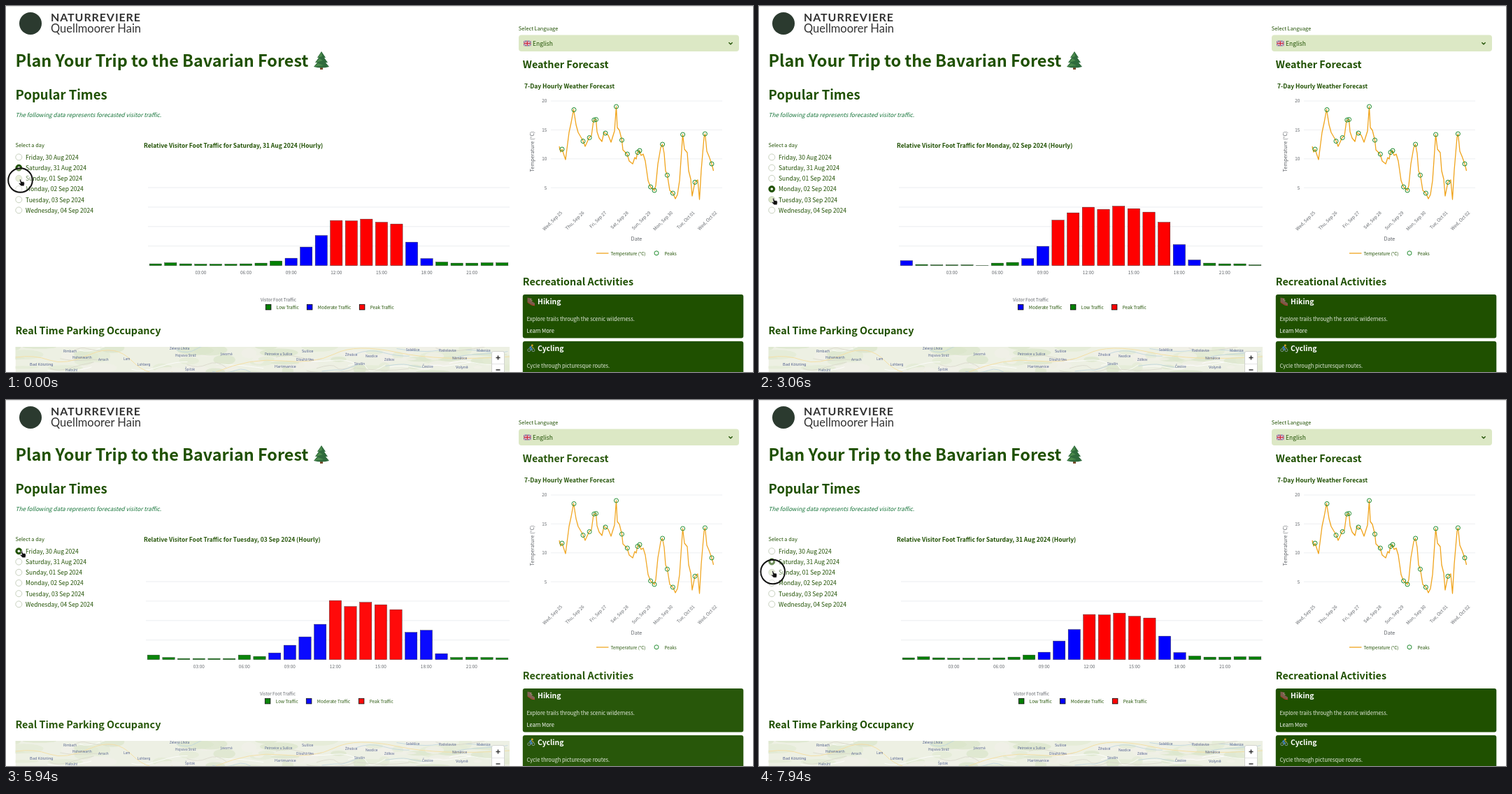
Recreate the animation shown at these times as an HTML page. Size 1068 by 524 pixels, loop 8000 ms.

```html
<!DOCTYPE html>
<html lang="en">
<head>
<meta charset="utf-8">
<title>Trip planner</title>
<style>
html, body { margin: 0; width: 100%; height: 100%; overflow: hidden; background: #fff; }
svg { display: block; width: 100vw; height: 100vh; }
text { font-family: "Noto Sans CJK JP", "Noto Sans CJK SC", "Noto Sans CJK KR", "Noto Sans CJK", "Noto Sans", sans-serif; fill: #1f5000; white-space: pre; }
.logo text { font-family: Lato, sans-serif; fill: #333; }
.map text { font-family: "Noto Sans", sans-serif; fill: #52608f; }
</style>
</head>
<body>
<svg id="stage" viewBox="0 0 1068 524" preserveAspectRatio="none"></svg>
<script>
const NS = 'http://www.w3.org/2000/svg';
const LOOP = 8000;
const GREEN = '#1f5000';
const GREY = '#5f6368';
const stage = document.getElementById('stage');

function add(parent, tag, attrs = {}) {
  const node = document.createElementNS(NS, tag);
  for (const key in attrs) node.setAttribute(key, attrs[key]);
  parent.appendChild(node);
  return node;
}
const group = (parent, attrs) => add(parent, 'g', attrs);
const rect = (parent, x, y, width, height, fill, more) => add(parent, 'rect', { x, y, width, height, fill, ...more });
const circle = (parent, cx, cy, r, fill, more) => add(parent, 'circle', { cx, cy, r, fill, ...more });
const path = (parent, d, stroke, width = 1, more) =>
  add(parent, 'path', { d, fill: 'none', stroke, 'stroke-width': width, ...more });
function label(parent, str, x, y, size, more) {
  const node = add(parent, 'text', { x, y, 'font-size': size, ...more });
  node.textContent = str;
  return node;
}
const bold = { 'font-weight': 700 };
const semi = { 'font-weight': 600 };
const mid = { 'text-anchor': 'middle' };

// ---- header ----
const page = group(stage);
rect(page, 0, 0, 1068, 1, '#e4e4e4');
const logo = group(page, { class: 'logo' });
circle(logo, 35, 25, 16, '#2b3a2f');
label(logo, 'NATURREVIERE', 64, 21.6, 16, { ...bold, 'letter-spacing': 0.9 });
label(logo, 'Quellmoorer Hain', 64, 37.5, 16.5);
label(page, 'Plan Your Trip to the Bavarian Forest', 13.5, 87, 23.4, bold);

const tree = group(page, { transform: 'translate(451 65)' });
rect(tree, -2, 20, 4, 6, '#7a4a2b');
add(tree, 'path', { d: 'M0 0L6 9H4L9 16H6L11 22Q0 25-11 22L-6 16H-9L-4 9H-6Z', fill: '#2f6b3c' });
add(tree, 'path', { d: 'M0 1L-5 9L1 7ZM-3 10L-8 16L2 13ZM-5 17L-10 22L3 20Z', fill: '#4c8a4d' });

label(page, 'Popular Times', 13.5, 133.5, 18.5, semi);
label(page, 'The following data represents forecasted visitor traffic.', 13.5, 158.8, 8.25,
  { 'font-style': 'italic', style: 'fill:#17753a' });

// ---- day picker ----
const days = ['Friday, 30 Aug 2024', 'Saturday, 31 Aug 2024', 'Sunday, 01 Sep 2024',
  'Monday, 02 Sep 2024', 'Tuesday, 03 Sep 2024', 'Wednesday, 04 Sep 2024'];
const rowY = i => 216.4 + i * 15.2;
label(page, 'Select a day', 13.5, 201.5, 7.4);
const radios = days.map((day, i) => {
  label(page, day, 28, rowY(i) + 3.4, 8.5);
  return {
    disc: circle(page, 18.3, rowY(i), 4.5, '#fff', { 'stroke-width': 0.8 }),
    dot: circle(page, 18.3, rowY(i), 1.8, '#fff')
  };
});

// ---- language box ----
label(page, 'Select Language', 732.8, 35, 7.4);
rect(page, 733, 41.5, 315, 23.5, '#dce8c5', { rx: 4 });
const flag = group(page, { transform: 'translate(740 49.7)' });
rect(flag, 0, 0, 10.5, 7.6, '#2b3f86', { rx: 0.8 });
path(flag, 'M0 0L10.5 7.6M10.5 0L0 7.6', '#fff', 1.5);
path(flag, 'M0 0L10.5 7.6M10.5 0L0 7.6', '#c8283c', 0.6);
path(flag, 'M5.25 0V7.6M0 3.8H10.5', '#fff', 2.6);
path(flag, 'M5.25 0V7.6M0 3.8H10.5', '#c8283c', 1.4);
label(page, 'English', 753, 57, 8.5);
path(page, 'M1033.4 52.2L1036 54.8L1038.6 52.2', GREEN, 1.3);

// ---- everything that dims while data reloads ----
const live = group(page);
label(live, 'Real Time Parking Occupancy', 13.5, 469.5, 14.35, semi);
label(live, 'Weather Forecast', 738.8, 89, 14.35, semi);
label(live, 'Recreational Activities', 738.8, 399.5, 14.35, semi);

function drawWeather() {
  const g = group(live);
  const tick = { style: `fill:${GREY}` };
  label(g, '7-Day Hourly Weather Forecast', 741, 118, 8.5, bold);
  [20, 15, 10, 5].forEach((v, i) => {
    const y = 136 + i * 41.4;
    path(g, `M779 ${y}H1024`, '#e9ebef', 0.8);
    label(g, v, 773.3, y + 2.4, 6.4, { ...tick, 'text-anchor': 'end' });
  });
  ['Wed, Sep 25', 'Thu, Sep 26', 'Fri, Sep 27', 'Sat, Sep 28', 'Sun, Sep 29', 'Mon, Sep 30', 'Tue, Oct 01', 'Wed, Oct 02']
    .forEach((day, i) => label(g, day, 0, 0, 6.4, {
      ...tick, 'text-anchor': 'end', transform: `translate(${795.5 + i * 31.6} 296.5) rotate(-45)`
    }));
  label(g, 'Temperature (°C)', 0, 0, 7.35, { ...tick, ...mid, transform: 'translate(754.5 208.5) rotate(-90)' });
  label(g, 'Date', 901.5, 335.5, 7.4, { ...tick, ...mid });

  const curve = [791,201, 793,209, 795,205, 800,220, 805,181, 808,167, 811.5,148, 815,170, 818,181, 825,193,
    828,201, 834,188, 837,186, 840,164, 843.5,162, 845,180, 848,189, 852,194, 855,181, 861,185, 865,195,
    870,179, 872.5,144, 874,174, 877,178, 880.5,192, 882,206, 888,212, 891,222, 896,226, 899,217, 901,219,
    903,209, 906,207, 908,214, 911,212, 914,222, 918,250, 921.5,259, 927,264, 929,257, 932,226, 936,203,
    938.5,198, 941,211, 943,236, 945.5,242, 949,264, 953.5,268, 957,276, 960,270, 963,250, 967.5,184,
    970,205, 974,210, 976,236, 979,248, 981,272, 985,252, 989,249, 991.5,277, 994,235, 998,188, 999.5,183,
    1002,208, 1005,215, 1009,226, 1011.5,236];
  add(g, 'polyline', { points: curve.join(' '), fill: 'none', stroke: '#f0a41c', 'stroke-width': 1.3, 'stroke-linejoin': 'round' });
  const peaks = [795,205, 812,148.5, 825,193.5, 834.2,188.5, 840.8,163.2, 843.6,162.5, 857,182, 872.5,144,
    880.5,192, 888.3,212, 903,209.5, 906,207, 921.6,259, 927,264, 938.6,198, 945.4,242.2, 953.4,268,
    967.6,184, 985,252.3, 999.4,183, 1009,226];
  const mark = (x, y) => circle(g, x, y, 3, 'none', { stroke: '#1d8a2b', 'stroke-width': 1 });
  for (let i = 0; i < peaks.length; i += 2) mark(peaks[i], peaks[i + 1]);

  path(g, 'M844 354H861.5', '#f0a41c', 1.3);
  label(g, 'Temperature (°C)', 864.5, 356.5, 6.3);
  mark(930, 353.8);
  label(g, 'Peaks', 941.5, 356.5, 6.3);
}
drawWeather();

function drawCard(y, height, name, about) {
  rect(live, 738.8, y, 315.5, height, GREEN, { rx: 3 });
  const white = { style: 'fill:#fff' };
  label(live, name, 760, y + 14.4, 10.45, { ...bold, ...white });
  label(live, about, 744.6, y + 37.8, 7.55, { style: 'fill:#e6ecdf' });
  label(live, 'Learn More', 744.6, y + 54.6, 7.55, white);
}
drawCard(413, 62.5, 'Hiking', 'Explore trails through the scenic wilderness.');
drawCard(480, 62.5, 'Cycling', 'Cycle through picturesque routes.');
const boot = group(live, { transform: 'translate(745.5 417.5)' });
add(boot, 'path', { d: 'M0 0L5 1L6 5L10.5 8V11L6 10L0 6Z', fill: '#7d5b4c' });
path(boot, 'M0 6.5L6 10.5L10.5 11.3', '#c0392f', 1);
path(boot, 'M4 2.5L6 2M5 4.5L7 4', '#d8c9b4', 0.7);
const biker = group(live, { transform: 'translate(745.5 484.5)' });
circle(biker, 2.3, 8.2, 2, 'none', { stroke: '#9aa7b0', 'stroke-width': 0.8 });
circle(biker, 8.4, 8.2, 2, 'none', { stroke: '#9aa7b0', 'stroke-width': 0.8 });
path(biker, 'M6 2.5L3.5 4.5L6 6L5 8.5', '#3f7fc4', 1.7);
path(biker, 'M6 3.5L9 5', '#e5b437', 1);
circle(biker, 6.8, 1.4, 1.4, '#d9a62e');

function drawMap() {
  const clip = add(add(stage, 'defs'), 'clipPath', { id: 'mapClip' });
  rect(clip, 13.5, 488, 706.5, 36, '#000');
  const g = group(live, { class: 'map', 'clip-path': 'url(#mapClip)' });
  rect(g, 13.5, 488, 706.5, 36, '#edf0e3');
  let seed = 11;
  const rnd = () => (seed = (seed * 16807) % 2147483647) / 2147483647;
  for (let i = 0; i < 70; i++) {
    add(g, 'ellipse', {
      cx: 14 + rnd() * 706, cy: 486 + rnd() * 40, rx: 6 + rnd() * 22, ry: 2 + rnd() * 7,
      fill: ['#dbe6cb', '#e3ebd5', '#f2f1e8'][i % 3], opacity: 0.75
    });
  }
  for (let i = 0; i < 26; i++) {
    const x = 14 + rnd() * 680, y = 488 + rnd() * 36;
    path(g, `M${x} ${y}q${10 + rnd() * 14} ${rnd() * 16 - 8} ${20 + rnd() * 20} ${rnd() * 8 - 4}t${22 + rnd() * 20} ${rnd() * 18 - 9}`,
      ['#fff', '#d8d6cb', '#bcd3df'][i % 3], 0.8);
  }
  path(g, 'M14 503Q40 499 62 507T120 499T180 508T238 524', '#f4dfa6', 1);
  path(g, 'M300 524Q350 503 395 508T470 498T560 496T720 502', '#f4dfa6', 1);
  const towns = [['Rimbach', 82, 496], ['Hohenwarth', 95, 505], ['Arrach', 132, 508], ['Lam', 168, 507],
    ['Haibühl', 85, 523], ['Lohberg', 188, 515], ['Zelená Lhota', 234, 492], ['Hojsova Stráž', 242, 502],
    ['Špičák', 256, 522], ['Javorná', 307, 500], ['Petrovice u Sušice', 370, 500], ['Dlouhá Ves', 415, 508],
    ['Žihobce', 485, 501], ['Strašín', 498, 514], ['Nezdice', 514, 503], ['Zdíkov', 541, 508],
    ['Soběšice', 572, 494], ['Čestice', 595, 518], ['Radošovice', 619, 495], ['Němětice', 638, 506], ['Malenice', 673, 495]];
  for (const [name, x, y] of towns) label(g, name, x, y, 4.7);
  for (const [name, x, y] of [['Bad Kötzting', 34, 515], ['Hartmanice', 384, 518], ['Sušice', 423, 496], ['Volyně', 643, 519]])
    label(g, name, x, y, 5.6, { 'font-weight': 500 });
  rect(g, 694.5, 494.5, 18, 34, '#fff', { rx: 2.5, stroke: '#d2d4ce', 'stroke-width': 1 });
  path(g, 'M695 512.5H712', '#ddd', 0.8);
  path(g, 'M700.5 503.5H706.5M703.5 500.5V506.5M700.5 521H706.5', '#333', 1.5);
}
drawMap();

// ---- visitor charts: bar heights, colour runs, left edge of the plot ----
const BASE = 371.6;
const charts = [
  { left: 203, runs: 'g9b3r4b2g6', bars: [2.5,3.5,3.5,4,4,2.5,2.5,2.5,6,16.5,24.5,39,57.5,57,58.5,58.5,53.5,31.5,1,3.5,2.5,3.5,3,3.5] },
  { left: 203, runs: 'g9b3r5b2g5', bars: [2.5,4,2.5,2,2,2,2.5,3.5,6.5,10.5,26.5,43,64.5,64,66.5,62,59.5,33.5,10,5,3.5,3.5,4,4] },
  { left: 200, runs: 'g7b3r9b1g4', bars: [3.5,2.5,2.5,2.5,2.5,2.5,3.5,7,13,34,104.5,127.5,139,135.5,138,138,138,113.5,81,10,6,3,4,2] },
  { left: 200, runs: 'b1g7b2r8b2g4', bars: [7,1.5,1,1,1,0.3,3.5,4.5,10,27.5,65,75.5,83.5,80.5,85,81.5,76.5,62,30,8,3.5,2.5,2.5,1] },
  { left: 200, runs: 'g8b4r5b3g4', bars: [6.5,3,1.5,1.5,1.5,1.5,6.5,4.5,9.5,20.5,32.5,50.5,84.5,76,82,78.5,71.5,39,42,8.5,3,3.5,3,2.5] }
];
const tone = { g: '#008000', b: '#0000ff', r: '#ff0000' };
const kinds = { g: 'Low Traffic', b: 'Moderate Traffic', r: 'Peak Traffic' };

function drawChart({ left, runs, bars }, day) {
  const g = group(live);
  const step = (720 - left) / 24;
  const colours = runs.replace(/([a-z])(\d+)/g, (_, c, n) => c.repeat(n));
  label(g, `Relative Visitor Foot Traffic for ${days[day]} (Hourly)`, 197, 202.8, 8.47, bold);
  for (let i = 0; i < 5; i++) path(g, `M${left} ${260 + i * 27.9}H720`, '#e9ebef', 0.9);
  bars.forEach((h, i) => rect(g, left + (i + 0.1) * step, BASE - h, step * 0.8, h, tone[colours[i]],
    { stroke: '#222', 'stroke-width': 0.4 }));
  for (let h = 3; h < 24; h += 3)
    label(g, String(h).padStart(2, '0') + ':00', left + (h + 0.5) * step, 384, 6.4, { ...mid, style: `fill:${GREY}` });
  const shift = left === 203 ? 1 : 0;
  label(g, 'Vistor Foot Traffic', 363 + shift, 422.8, 6.3, { style: `fill:${GREY}` });
  const order = runs[0] === 'b' ? 'bgr' : 'gbr';
  const slots = runs[0] === 'b' ? [370, 445, 504] : [370, 429, 504];
  slots.forEach((x, i) => {
    rect(g, x + shift + 0.3, 427.3, 7.6, 7.6, tone[order[i]], { stroke: '#000', 'stroke-width': 0.8 });
    label(g, kinds[order[i]], x + shift + 15.8, 433.8, 6.3);
  });
  return g;
}
const plots = charts.map(drawChart);

// ---- pointer ----
const ring = circle(stage, 0, 0, 17.3, 'rgba(255,255,255,.35)', { stroke: '#111', 'stroke-width': 2 });
const hand = group(stage);
add(hand, 'path', {
  d: 'M-2.6 -4.6Q-1.6 -5.6 -.8 -4.4L.3 -1.6L3 -1.4Q4.6 -.8 4.4 1.4L3.8 4.8H-.4L-3.6 1.4Q-3.8 .2 -2.4 .4L-1.4 1Z',
  fill: '#111', stroke: '#fff', 'stroke-width': 0.6
});

// Each click: ring shows from press to pick, page dims from dim until swap.
const clicks = [
  { day: 2, press: -100, pick: 120, dim: 620, swap: 900 },
  { day: 3, press: 1530, pick: 1780, dim: 2230, swap: 2500 },
  { day: 4, press: 3410, pick: 3620, dim: 4060, swap: 4260 },
  { day: 0, press: 5130, pick: 5340, dim: 5780, swap: 6170 },
  { day: 1, press: 6650, pick: 6890, dim: 7340, swap: 7560 },
  { day: 2, press: 7900, pick: 8120, dim: 8620, swap: 8900 }
];
const moves = [
  [0, 22, 253], [1350, 22, 253], [1520, 22, 266], [2600, 22, 266], [2880, 22, 280], [4080, 22, 280],
  [4350, 25.5, 259.5], [4820, 24, 221], [6300, 24, 221], [6500, 22, 233], [7600, 22, 233], [7880, 21, 249], [8000, 21.5, 250]
];
const clamp = v => Math.max(0, Math.min(1, v));
const ease = p => p * p * (3 - 2 * p);

function pointerAt(t) {
  const i = moves.findIndex((m, k) => k && t <= m[0]);
  const [t0, x0, y0] = moves[i - 1], [t1, x1, y1] = moves[i];
  const p = ease((t - t0) / (t1 - t0));
  return [x0 + (x1 - x0) * p, y0 + (y1 - y0) * p];
}

function draw(t) {
  let picked = 1, shown = 1, dim = 1, press = 0;
  for (const c of clicks) {
    if (t >= c.pick) picked = c.day;
    if (t >= c.swap) shown = c.day;
    else if (t >= c.dim) dim = 1 - 0.67 * Math.pow((t - c.dim) / 1000, 1.5);
    if (t > c.press && t < c.pick) press = Math.min(clamp((t - c.press) / 40), clamp((c.pick - t) / 80));
  }
  const [x, y] = pointerAt(t);
  const hover = Math.round((y - 3.5 - rowY(0)) / 15.2);
  radios.forEach(({ disc, dot }, i) => {
    const on = i === picked;
    disc.setAttribute('fill', on ? GREEN : i === hover ? '#dce8c5' : '#fff');
    disc.setAttribute('stroke', on ? GREEN : '#b9c4ae');
    dot.setAttribute('opacity', on ? 1 : 0);
  });
  plots.forEach((plot, i) => plot.setAttribute('display', i === shown ? 'inline' : 'none'));
  live.setAttribute('opacity', dim);
  hand.setAttribute('transform', `translate(${x} ${y})`);
  ring.setAttribute('cx', x - 1.5);
  ring.setAttribute('cy', y - 3.5);
  ring.setAttribute('r', 12 + 5.3 * press);
  ring.setAttribute('opacity', press);
}

const start = performance.now();
function tick(now) {
  draw(Math.max(0, now - start) % LOOP);
  requestAnimationFrame(tick);
}
draw(0);
requestAnimationFrame(tick);
</script>
</body>
</html>
```
